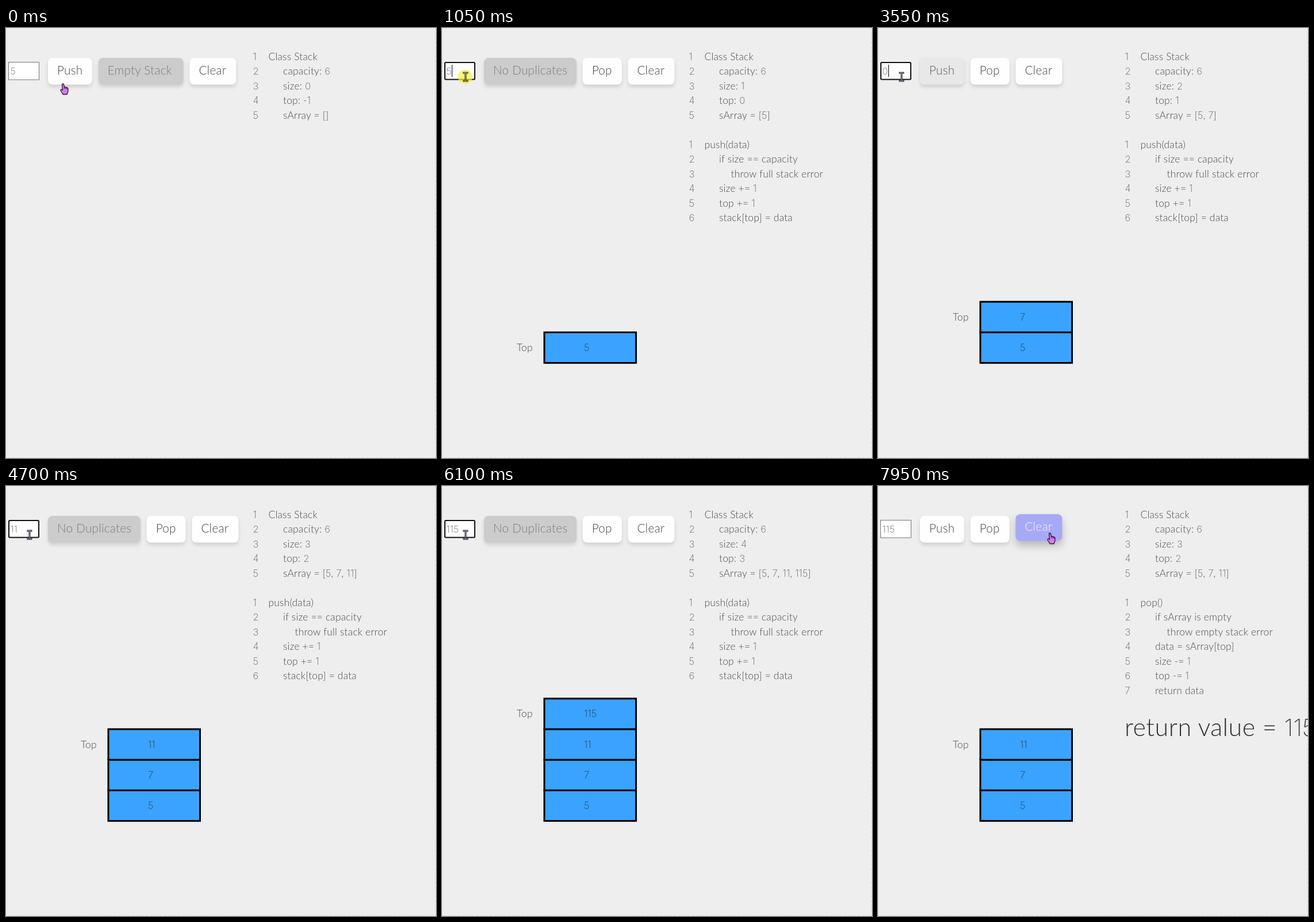
Animation, 748 px wide and 748 px high, one loop 8 s. Source, as an HTML page:

```html
<!DOCTYPE html>
<html lang="en">
<head>
<meta charset="utf-8">
<title>Stack</title>
<style>
  html, body { margin: 0; width: 100%; height: 100%; overflow: hidden; background: #eee; }
  svg { display: block; width: 100vw; height: 100vh; }
  text { font-family: Lato, "Open Sans", sans-serif; font-weight: 300; letter-spacing: .0115em; }
  .digit { font-family: Inter, Roboto, sans-serif; font-size: .96em; font-weight: 200; fill-opacity: .85; letter-spacing: 0; }
</style>
</head>
<body>
<svg id="stage" viewBox="0 0 748 748"></svg>
<script>
const LOOP = 8000, FOCUS = 960, BLUR = 7500, POP = 7650;
const INK = '#464951', VIOLET = [178, 160, 245], BLUE = [166, 170, 246];

// [time, value]
const typed = [[0, '5'], [1850, '0'], [2050, '7'], [3260, '0'], [4000, '1'],
  [4100, '11'], [5000, '1'], [5150, '11'], [5280, '115']];
const pushes = [[400, 5], [2950, 7], [4300, 11], [5700, 115]];
const duplicate = [[-999, 0], [400, 1], [1850, 0], [2950, 1], [3390, 0],
  [4300, 1], [5000, 0], [5700, 1], [POP, 0]];
const clicks = [[350, 450], [FOCUS, 1110], [BLUR, POP]];
const path = [[0, 99, 97], [50, 99, 97], [250, 103, 84], [700, 103, 84], [930, 41, 85],
  [6600, 41, 85], [7050, 303, 82], [7700, 303, 82], [7820, 299, 82], [LOOP, 299, 82]];

const pushCode = ['push(data)', ' if size == capacity', '  throw full stack error',
  ' size += 1', ' top += 1', ' stack[top] = data'];
const popCode = ['pop()', ' if sArray is empty', '  throw empty stack error',
  ' data = sArray[top]', ' size -= 1', ' top -= 1', ' return data'];
const indents = [456.5, 482, 502.5];
const widths = { Push: 77, 'No Duplicates': 161, Pop: 68, 'Empty Stack': 148, Clear: 81 };
const digitWidth = { 0: 10, 1: 5.7, 5: 9, 7: 8 };

const ease = p => { p = Math.max(0, Math.min(1, p)); return p * p * (3 - 2 * p); };
const fade = (t, start, length = 300) => ease((t - start) / length);
const latest = (list, t) => list.filter(e => e[0] <= t).pop();
const mix = (a, b, p) => a.map((v, i) => v + (b[i] - v) * p);
const rgb = c => `rgb(${c.map(Math.round)})`;

function text(x, y, str, size = 17.4, fill = INK) {
  const body = String(str).replace(/\d+/g, '<tspan class="digit">$&</tspan>');
  return `<text x="${x}" y="${y}" font-size="${size}" fill="${fill}">${body}</text>`;
}

function button(x, label, grey, hover, tint) {
  const bg = mix(mix([254, 254, 254], [204, 204, 204], grey), tint, hover);
  const fg = mix(mix([68, 70, 78], [124, 124, 124], grey), [245, 243, 255], hover);
  const shadow = `drop-shadow(0 ${4 + 4 * hover}px ${3 + 4 * hover}px rgba(0,0,0,${.13 + .1 * hover}))`;
  return `<g transform="translate(${x} ${52 - 3 * hover})">
    <rect width="${widths[label]}" height="46.5" rx="8" fill="${rgb(bg)}" style="filter:${shadow}"/>
    ${text(16, 29, label, 20.7, rgb(fg))}</g>`;
}

function buttons(t) {
  const dup = latest(duplicate, t);
  const dupGrey = dup[1] ? fade(t, dup[0]) : 1 - fade(t, dup[0]);
  const row = [
    [dup[1] ? 'No Duplicates' : 'Push', dupGrey, fade(t, 50) - fade(t, 400), VIOLET],
    [t < 400 ? 'Empty Stack' : 'Pop', 1 - fade(t, 400), fade(t, 6950) - fade(t, POP), VIOLET],
    ['Clear', 0, fade(t, POP), BLUE]
  ];
  let x = 73;
  return row.map(b => {
    const out = button(x, ...b);
    x += widths[b[0]] + 10.7;
    return out;
  }).join('');
}

function field(t) {
  const [time, value] = latest(typed, t);
  const focus = t >= FOCUS && t < BLUR;
  let out = focus
    ? '<rect x="5" y="60" width="52" height="29.5" rx="1.5" fill="#fff" stroke="#111" stroke-width="2"/>'
    : '<rect x="4.5" y="59.5" width="53" height="30.5" fill="#fff" stroke="#767676"/>';
  out += text(7.5, 81, value, 17);
  const since = t - Math.max(time, FOCUS);
  if (focus && Math.floor(since / 490) % 2 === 0) {
    const x = [...value].reduce((sum, d) => sum + digitWidth[d], 8);
    out += `<rect x="${Math.floor(x)}" y="64" width="1" height="21" fill="#000"/>`;
  }
  return out;
}

function code(lines, first) {
  return lines.map((line, i) => {
    const y = 55.5 + 25.53 * (first + i);
    const depth = line.length - line.trimStart().length;
    return text(429.5, y, i + 1) + text(indents[depth], y, line.trim());
  }).join('');
}

function blocks(items, t) {
  const top = i => 529.4 - 53.2 * i;
  let out = items.map(([time, value], i) => `<g opacity="${fade(t, time)}">
    <rect x="178" y="${top(i)}" width="159.5" height="53.2" fill="#3aa3ff" stroke="#000" stroke-width="3"/>
    ${text(247, top(i) + 32.5, value, 17.4, '#222833')}</g>`).join('');
  if (items.length) out += text(130, top(items.length - 1) + 32.5, 'Top');
  return out;
}

function pointer(t) {
  const i = path.findIndex(p => p[0] > t);
  const [t0, x0, y0] = path[i - 1], [t1, x1, y1] = path[i];
  const p = ease((t - t0) / (t1 - t0));
  const x = x0 + (x1 - x0) * p, y = y0 + (y1 - y0) * p;
  const beam = x < 58;
  const pressed = clicks.some(([a, b]) => t >= a && t < b);
  const shape = beam
    ? `<path d="M-4.500-7H-1L0-6L1-7H4.500M0-6V6M-4.500 7H-1L0 6L1 7H4.500" fill="none" stroke="#2b2333" stroke-width="3"/>
       <path d="M-3.500-7H3.500M0-6V6M-3.500 7H3.500" stroke="${pressed ? '#d8cf4a' : '#b79ac6'}"/>`
    : `<path d="M-1.500 1Q0-1 1.500 1L2.500 6Q4 5 5 6.200Q6.500 5.500 7.200 7Q8.800 6.800 9 9L8.800 14L7 18.500H0L-3.800 12Q-4.500 9.500-2 9.800L-.5 11Z"
       fill="#d77bf2" stroke="#2b1a33" stroke-width="1.300" stroke-linejoin="round"/>
       <path d="M2.500 6V9M5 6.500V9.500M7.200 7.500V10" stroke="#2b1a33"/>`;
  const glow = pressed ? '<circle cx="-.5" r="12.500" fill="#f7ee3c" opacity=".7"/>' : '';
  return `<g transform="translate(${x} ${y})">${glow}${shape}</g>`;
}

function draw(t) {
  const popped = t >= POP;
  const items = pushes.filter(e => e[0] <= t);
  if (popped) items.pop();
  const size = items.length;
  const state = ['Class Stack', ' capacity: 6', ` size: ${size}`, ` top: ${size - 1}`,
    ` sArray = [${items.map(e => e[1]).join(', ')}]`];
  let out = '<path d="M747.500 0V747.500H0" fill="none" stroke="#dcdcdc" stroke-dasharray="4 4"/>';
  out += field(t) + buttons(t) + code(state, 0) + blocks(items, t);
  if (popped) out += code(popCode, 6) + text(429, 435, 'return value = 115', 43, '#2e3036');
  else if (t >= 400) out += code(pushCode, 6);
  stage.innerHTML = out + pointer(t);
}

const stage = document.getElementById('stage');
const start = performance.now();
function frame() {
  draw((performance.now() - start) % LOOP);
  requestAnimationFrame(frame);
}
frame();
</script>
</body>
</html>
```
